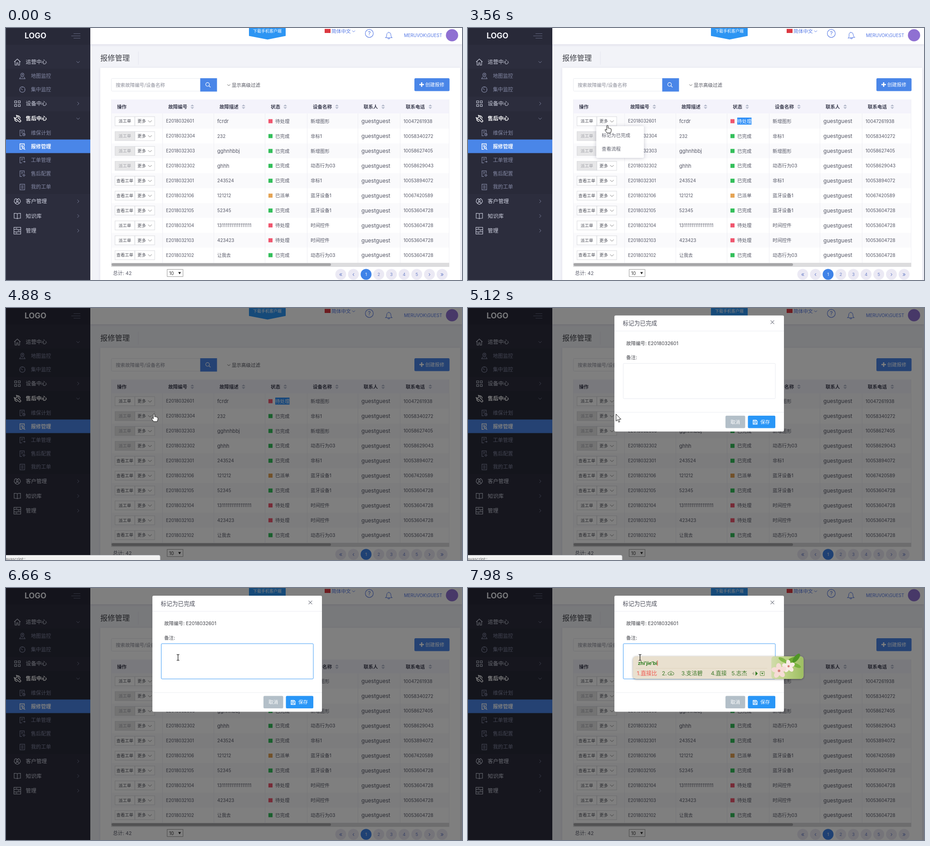
Recreate the animation shown at these times as an HTML page with a canvas. Size 1006 by 557 pixels, loop 8000 ms.

```html
<!DOCTYPE html>
<html lang="zh">
<head>
<meta charset="utf-8">
<title>报修管理</title>
<style>
html, body { margin: 0; width: 100%; height: 100%; overflow: hidden; background: #f2f3f8; }
canvas { display: block; }
</style>
</head>
<body>
<canvas id="stage" width="1006" height="557"></canvas>
<script>
const LOOP = 8000;
const c = document.getElementById('stage').getContext('2d');
const FONT = 'Inter, "Noto Sans CJK SC", "Noto Sans CJK", sans-serif';
const BLUE = '#4a86e8';
const clamp = v => Math.max(0, Math.min(1, v));
const smooth = p => p * p * (3 - 2 * p);

function rect(x, y, w, h, color) {
  c.fillStyle = color;
  c.fillRect(x, y, w, h);
}
function round(x, y, w, h, r, fill, stroke) {
  c.beginPath();
  c.roundRect(x, y, w, h, r);
  if (fill) { c.fillStyle = fill; c.fill(); }
  if (stroke) { c.strokeStyle = stroke; c.lineWidth = 1; c.stroke(); }
}
function disc(x, y, r, fill) {
  c.beginPath();
  c.arc(x, y, r, 0, 7);
  c.fillStyle = fill;
  c.fill();
}
function oval(x, y, rx, ry, turn, fill) {
  c.beginPath();
  c.ellipse(x, y, rx, ry, turn, 0, 7);
  c.fillStyle = fill;
  c.fill();
}
function shape(points, fill) {
  c.beginPath();
  points.forEach(([x, y]) => c.lineTo(x, y));
  c.closePath();
  c.fillStyle = fill;
  c.fill();
}
// y is the visual middle of the line
function text(s, x, y, size, color, weight = 400, align = 'left', font = FONT) {
  c.font = `${weight} ${size}px ${font}`;
  c.textAlign = align;
  c.fillStyle = color;
  c.fillText(s, x, y + size * 0.36);
}
// d is drawn in a 16 unit box centred on x, y
function icon(d, x, y, size, color, width = 1.1) {
  c.save();
  c.translate(x - size / 2, y - size / 2);
  c.scale(size / 16, size / 16);
  c.strokeStyle = color;
  c.lineWidth = width * 16 / size;
  c.stroke(new Path2D(d));
  c.restore();
}
function shadowed(blur, dy, color, draw) {
  c.save();
  c.shadowColor = color;
  c.shadowBlur = blur;
  c.shadowOffsetY = dy;
  draw();
  c.restore();
}

const DOWN = 'M1 5L8 12L15 5', RIGHT = 'M5 1L12 8L5 15';
const DOC = 'M13 7V1H2V15H7M5 5H10M5 8H9';
const ICONS = {
  home: 'M1 8L8 1.5L15 8M3 7V15H6.5V10H9.5V15H13V7',
  pin: 'M8 11C5 8 4 7 4 5A4 4 0 0 1 12 5C12 7 11 8 8 11ZM4 10L1 15H15L12 10M9 5A1 1 0 1 1 7 5A1 1 0 1 1 9 5',
  gauge: 'M15 8A7 7 0 1 1 1 8A7 7 0 1 1 15 8M9 9L4 5M8 1V3M13 8H15M1 8H3',
  grid: 'M2 2h4.5v4.5h-4.5zM10 2h4.5v4.5h-4.5zM2 10h4.5v4.5h-4.5zM10 10h4.5v4.5h-4.5z',
  wrench: 'M6 1A5 5 0 0 1 10 7L15 12A2 2 0 0 1 12 15L7 10A5 5 0 0 1 1 6L4 7.5L7 5ZM9 2A5 5 0 0 1 14 8M2 10A5 5 0 0 0 8 14',
  plan: DOC + 'M15 12A3 3 0 1 1 9 12A3 3 0 1 1 15 12M12 10V12H14',
  repair: DOC + 'M13 11A2.5 2.5 0 1 1 8 11A2.5 2.5 0 1 1 13 11M12 13L15 16',
  order: DOC + 'M9 12H15M13 10L15 12L13 14',
  config: DOC + 'M14 12A2 2 0 1 1 10 12A2 2 0 1 1 14 12M12 8.5V10M12 14V15.5M8.5 12H10M14 12H15.5',
  mine: 'M2 1H14V15H2ZM5 5H11M5 8H11M5 11H11',
  client: 'M2 4L5 2L8 4L11 2L14 5L15 9L12 13L8 15L4 13L1 9ZM10 7A2 2 0 1 1 6 7A2 2 0 1 1 10 7M4 12L8 9L12 12',
  book: 'M8 3C6 2 3 2 1 2V13C3 13 6 13 8 14C10 13 13 13 15 13V2C13 2 10 2 8 3V14',
  tune: 'M.5 .5H15.5V15.5H.5ZM.5 5.5H15.5M.5 10.5H15.5M4 3H8M9 8H13M4 13H8'
};
// icon, label, y, kind: d = open group, r = closed group, s = sub item
const MENU = [
  ['home', '运营中心', 75, 'd'], ['pin', '地图监控', 106, 's'], ['gauge', '集中监控', 136, 's'],
  ['grid', '设备中心', 167, 'r'], ['wrench', '售后中心', 200, 'd'], ['plan', '维保计划', 232, 's'],
  ['repair', '报修管理', 262, 's'], ['order', '工单管理', 292, 's'], ['config', '售后配置', 322, 's'],
  ['mine', '我的工单', 351.5, 's'], ['client', '客户管理', 383, 'r'], ['book', '知识库', 415.5, 'r'],
  ['tune', '管理', 448, 'r']
];
const COLS = [['操作', 245], ['故障编号', 358, 411], ['故障描述', 471, 524], ['状态', 584, 616],
  ['设备名称', 677, 730], ['联系人', 789, 832], ['联系电话', 882, 936]];
const STATES = { 待处理: '#f0566e', 已完成: '#34bf5b', 已派单: '#e5a455' };
// action, number, description, state, device, phone
const ROWS = [
  ['派工单', '2601', 'fcrdr', '待处理', '新增图形', '10047261938'],
  ['-派工单', '2304', '232', '已完成', '非标1', '10058340272'],
  ['-派工单', '2303', 'gghnhbbj', '已完成', '新增图形', '10058627405'],
  ['-派工单', '2302', 'ghhh', '已完成', '动态行为03', '10058629043'],
  ['查看工单', '2301', '243524', '已完成', '非标1', '10053894072'],
  ['查看工单', '2106', '121212', '已派单', '蓝牙设备1', '10067420589'],
  ['查看工单', '2105', '52345', '已完成', '蓝牙设备1', '10053604728'],
  ['派工单', '2104', '13' + '1'.repeat(16), '待处理', '时间控件', '10053604728'],
  ['派工单', '2103', '423423', '待处理', '时间控件', '10053604728'],
  ['查看工单', '2102', '让我去', '已完成', '动态行为03', '10053604728']
];

function sidebar() {
  rect(0, 0, 186, 557, '#2c2d3d');
  rect(0, 0, 186, 37, '#282938');
  rect(0, 90, 186, 62, '#292a39');
  rect(0, 184, 186, 183, '#292a39');
  text('LOGO', 41, 17, 17, '#f2f3f8', 700);
  [[149, 12.5], [144, 17.5], [149, 22.5]].forEach(([x, y]) => rect(x, y - .5, 164 - x, 1, '#62667f'));
  rect(0, 246.5, 186, 30, BLUE);
  for (const [name, label, y, kind] of MENU) {
    const sub = kind === 's', active = name === 'repair' || name === 'wrench';
    const color = active ? '#fff' : sub ? '#858aa6' : '#d0d3e2';
    icon(ICONS[name], sub ? 36 : 25, y, sub ? 14 : 16, color, active ? 1.5 : 1.1);
    text(label, sub ? 55 : 43.5, y, sub ? 11.1 : 11.7, color, active ? 600 : 400);
    if (!sub) icon(kind === 'd' ? DOWN : RIGHT, 159, y, 8, '#787d99', 1);
  }
}

function bell(t) {
  const shaking = [500, 3560, 5940].some(s => t >= s && t < s + 340);
  c.save();
  c.translate(844.5, 9);
  if (shaking) c.rotate(0.12 * Math.sin(t / 32));
  icon('M1 13C4 11 3 8 3.5 6A4.5 4.5 0 0 1 12.5 6C13 8 12 11 15 13ZM6 13.5A2 2 0 0 0 10 13.5M8 0V2', 0, 7.5, 16, '#6383e6');
  c.restore();
}

function header(t) {
  shadowed(5, 1, 'rgba(70,60,120,.16)', () => rect(186, 0, 820, 36, '#fff'));
  shape([[536, 0], [617, 0], [617, 17.5], [577, 25.5], [536, 17.5]], '#2d95f3');
  text('下载手机客户端', 576.5, 7, 9, '#fff', 400, 'center');
  rect(703, 2, 13, 9, '#dc3840');
  text('简体中文', 718, 7, 10.7, '#5578e5');
  icon(DOWN, 767, 7, 7, '#5578e5', 1);
  c.beginPath();
  c.arc(801.5, 12, 8.8, 0, 7);
  c.strokeStyle = '#6383e6';
  c.lineWidth = 1.2;
  c.stroke();
  text('?', 801.5, 12, 12, '#5578e5', 400, 'center');
  bell(t);
  text('MERUVOK\\GUEST', 878, 17, 9.7, '#5578e5');
  disc(984, 16, 13.5, '#8f70d2');
}

function outlineButton(s, x, y, off) {
  rect(x, y - 10.5, 44.5, 21, '#d9dade');
  rect(x + 1, y - 9.5, 42.5, 19, off ? '#e7e7e8' : '#fff');
  text(s, x + 22.2, y, 9.3, off ? '#a0a1a8' : '#4c4e58', 400, 'center');
}

function table(selectFrom) {
  rect(232, 158, 746, 31, '#f4f3fb');
  for (const [label, x, sort] of COLS) {
    text(label, x, 174, 10.5, '#3c3e50', 600);
    if (!sort) continue;
    shape([[sort - 4, 173], [sort, 169], [sort + 4, 173]], '#b4bacb');
    shape([[sort - 4, 175], [sort, 179], [sort + 4, 175]], '#b4bacb');
  }
  const ink = '#565867';
  ROWS.forEach(([action, no, note, state, device, phone], i) => {
    const y = 206 + 32.9 * i, off = action[0] === '-';
    rect(232, y - 16.5, 746, 32.9, i % 2 ? '#fff' : '#fafafc');
    outlineButton(action.replace('-', ''), 240, y, off);
    outlineButton('', 284, y);
    text('更多', 290, y, 9.4, '#4c4e58');
    icon(DOWN, 317.5, y, 9, '#777', 1);
    text('E201803' + no, 353, y, 9.7, ink);
    text(note, 466, y, /[a-z]/.test(note) ? 11.2 : 10, ink);
    rect(579, y - 4.5, 9, 9, STATES[state]);
    text(state, 594, y, 10.5, ink);
    text(device, 672, y, 10.4, ink);
    text('guestguest', 784, y, 12.1, ink);
    text(phone, 877, y, 10, ink);
  });
  [345, 458, 571, 664, 776, 869].forEach(x => rect(x, 189, 1, 330, '#eeeef3'));
  rect(232, 158, 1, 361, '#f0f0f5');
  rect(977, 158, 1, 361, '#f0f0f5');
  if (selectFrom < 625) {
    c.save();
    c.beginPath();
    c.rect(selectFrom, 198, 625.5 - selectFrom, 15.5);
    c.clip();
    rect(594, 198, 32, 16, '#2f8ff7');
    text('待处理', 594, 206, 10.5, '#fff');
    c.restore();
  }
  rect(232, 519, 746, 9, '#dcdcde');
  round(233, 520, 484, 6, 3, '#a6a6a8');
}

function page(t, selectFrom) {
  rect(0, 0, 1006, 557, '#f2f3f8');
  text('报修管理', 208, 66, 16.3, '#3f4047');
  rect(291.5, 52, 1, 29, '#e4e6ee');
  shadowed(6, 1, 'rgba(70,60,120,.10)', () => rect(208, 88, 794, 480, '#fff'));
  header(t);
  sidebar();
  round(232.5, 111.5, 200, 28, 2, '#fff', '#e8eaf0');
  text('搜索故障编号/设备名称', 242, 126, 10.5, '#8a8c98');
  rect(428.5, 111, 37, 29.5, BLUE);
  icon('M12 7A5 5 0 1 1 2 7A5 5 0 1 1 12 7M10.5 10.5L15 15', 445.5, 125.5, 13, '#fff', 1.2);
  icon(DOWN, 491.5, 126, 7, '#555', 1);
  text('显示高级过滤', 498, 126, 10.5, '#4f515c');
  round(901, 111, 77.5, 28.5, 2.5, BLUE);
  rect(912, 123.7, 10, 2.6, '#fff');
  rect(915.7, 120, 2.6, 10, '#fff');
  text('创建报修', 925, 125, 10.5, '#fff', 500);
  table(selectFrom);
  text('总计: 42', 236, 542, 10.8, '#565867');
  round(355.5, 533.5, 35, 16, 0, '#fff', '#999');
  text('10', 360, 542, 10, '#333');
  shape([[380, 539.5], [386, 539.5], [383, 544.5]], '#222');
  ['«', '‹', 1, 2, 3, 4, 5, '›', '»'].forEach((s, i) => {
    const x = 738.5 + 27.95 * i, on = s === 1;
    disc(x, 544.5, 12, on ? '#3f83e8' : '#ebe9f4');
    text(String(s), x, 544.5, typeof s === 'number' ? 9.5 : 13, on ? '#fff' : '#6e83c8', 400, 'center');
  });
}

function dropdown(hover) {
  shadowed(9, 1, 'rgba(60,60,90,.28)', () => round(283, 217, 105, 70, 2, '#fff'));
  if (hover) rect(283, 223, 105, 29, '#f4f5f8');
  text('标记为已完成', 295, 237.5, 10.5, '#5c5e6b');
  text('查看流程', 295, 267, 10.5, '#5c5e6b');
}

function statusBar() {
  round(-5, 546.5, 345, 20, 3, '#f2f2f2', '#c4c6ca');
  text('avascript:;', -1, 554.5, 9, '#666');
}

function modal(t) {
  const p = clamp((t - 4940) / 200);
  if (!p) return;
  c.save();
  c.globalAlpha = clamp(p * 1.5);
  c.translate(0, -64 * (1 - p) ** 2);
  round(323, 17, 374, 256.5, 3, '#fff');
  text('标记为已完成', 341.5, 34.5, 12.6, '#4a4c58');
  icon('M1 1L15 15M15 1L1 15', 671.5, 32, 9, '#777a85', 1.1);
  rect(323, 51, 374, 1, '#ebedf2');
  rect(323, 230.5, 374, 1, '#ebedf2');
  text('故障编号: E2018032601', 349, 78.5, 10.5, '#3f4047');
  text('备注:', 349, 110, 10.5, '#3f4047');
  const focused = t >= 6130;
  round(342.5, 123, 335.5, 78, 2, '#fff', focused ? '#3f9bf5' : '#e8eaf0');
  if (focused && Math.floor((t - 6130) / 530) % 2 === 0) rect(353, 129, 1, 15, '#222');
  round(568, 238.5, 43.5, 27.5, 2.5, '#b3bfc8');
  text('取消', 589.7, 252.5, 10.5, '#fff', 400, 'center');
  round(617.5, 238.5, 60.5, 27.5, 2.5, '#2996f7');
  icon('M2 2H11L14 5V14H2ZM5 2V6H10V2M5 14V9.5H11V14', 633.5, 253, 12, '#fff', 1.3);
  text('保存', 645, 252.5, 10.5, '#fff', 500);
  c.restore();
}

// start time, typed letters, candidates; * stands for the cloud sign
const TYPING = [
  [7120, 'z', '在 这 中 着 做'], [7200, 'zh', '这 中 着 只 种'], [7280, 'zhi', '直 只 指 之 至'],
  [7510, "zhi'j", '之间 * 直接 指节 之前'], [7610, "zhi'ji", '之际 * 直击 直接 指极'],
  [7740, "zhi'jie", '直接 * 指节 直解 之节'], [7890, "zhi'jie'b", '直接把 * 直接被 直接不 直接比'],
  [7970, "zhi'jie'bi", '直接比 * 支洁碧 直接 志杰']
];
// e is the right edge of the input panel
function flower(e) {
  const g = c.createLinearGradient(e - 72, 0, e, 0);
  g.addColorStop(0, '#d3dcae');
  g.addColorStop(.45, '#bdd286');
  g.addColorStop(1, '#9dbe62');
  round(e - 71, 151, 71, 50, [6, 7, 7, 6], g);
  oval(e - 27, 161, 17, 6, -.5, '#6da834');
  oval(e - 16, 155, 12, 5, -.9, '#4f9526');
  oval(e - 46, 159, 10, 4, .5, '#82b848');
  oval(e - 16, 171, 11, 4, .4, '#78b23e');
  for (const [x, y, r, tone] of [[e - 33, 173, 11, '#f8ebe5'], [e - 54, 183, 13, '#f6dcd6']]) {
    for (let i = 0; i < 5; i++) {
      const a = i * Math.PI * .4 - .4;
      oval(x + Math.cos(a) * r * .7, y + Math.sin(a) * r * .7, r * .62, r * .44, a, tone);
    }
    disc(x, y, r * .22, '#d47f78');
  }
}
function ime(t) {
  const step = TYPING.filter(s => t >= s[0]).pop();
  if (!step) return;
  const words = step[2].split(' '), size = 12.1;
  c.font = `400 ${size}px ${FONT}`;
  let end = 372.5;
  const slots = words.map((w, i) => {
    const label = `${i + 1}.${w}`, x = end;
    end += w === '*' ? 43 : c.measureText(label).width + (w === '支洁碧' ? 18 : 10.5);
    return [label, x, w === '*'];
  });
  end -= 10;
  const edge = end + 124;
  shadowed(4, 1, 'rgba(0,0,0,.4)', () => round(364, 151, edge - 364, 50, 7, '#e9e0cf'));
  rect(370, 177, edge - 450, 1, '#dfd4bf');
  flower(edge);
  text(step[1], 375, 166, 11, '#1f7514', 700, 'left', '"Liberation Sans", Arial, sans-serif');
  rect(375 + c.measureText(step[1]).width, 160, 1, 12, '#e04038');
  slots.forEach(([label, x, cloud], i) => {
    text(cloud ? '2.' : label, x, 188.5, size, i ? '#3f7a2c' : '#f0564e');
    if (cloud) icon('M4 13A3.5 3.5 0 0 1 4 6A4.5 4.5 0 0 1 12 6A3.5 3.5 0 0 1 12 13ZM10 9.5A2 2 0 1 1 6 9.5A2 2 0 1 1 10 9.5', x + 20, 188, 14, '#3f7a2c', 1);
  });
  shape([[end + 15, 185], [end + 10, 189], [end + 15, 193]], '#b9b79f');
  shape([[end + 18, 184], [end + 23, 189], [end + 18, 194]], '#2f7a1e');
  round(end + 28.5, 184.5, 9, 9, 0, null, '#6d9a50');
  shape([[end + 30.5, 187.5], [end + 35.5, 187.5], [end + 33, 191]], '#2f7a1e');
}

// time, x, y of the pointer
const PATH = [[70, 915, 546], [830, 688, 227], [1310, 632, 212], [1460, 632, 212], [1920, 599, 211],
  [2230, 599, 211], [2930, 307, 215], [3560, 307, 215], [4340, 326, 234], [5220, 326, 234],
  [5600, 351, 194], [5980, 379, 153]];
function pointerAt(t) {
  const i = PATH.findIndex(k => k[0] > t);
  if (i < 1) return (i ? PATH[PATH.length - 1] : PATH[0]).slice(1);
  const [t0, x0, y0] = PATH[i - 1], [t1, x1, y1] = PATH[i];
  const p = smooth((t - t0) / (t1 - t0));
  return [x0 + (x1 - x0) * p, y0 + (y1 - y0) * p];
}
const LOOKS = [[70, 'arrow'], [1200, 'beam'], [2300, 'arrow'], [2850, 'hand'], [4950, 'arrow'], [5450, 'beam']];
const ARROW = new Path2D('M0 0V15.5L3.6 12.2L6 18L8.4 17L6 11.4H11Z');
const HAND = new Path2D('M-1.5 0.5Q0 -1 1.5 0.5V6Q3 5 4 6.3Q5.5 5.6 6.3 7Q8.5 6.6 8.5 9V12L7 16.5H-1L-5 10.5Q-5.5 8.5 -3.5 8.8L-1.5 10.5Z');
const BEAM = new Path2D('M-3 -6.5H-1L0 -5.5L1 -6.5H3M0 -5.5V5.5M-3 6.5H-1L0 5.5L1 6.5H3');
function pointer(t, x, y) {
  const look = LOOKS.filter(k => t >= k[0]).pop();
  if (!look) return;
  c.save();
  c.translate(Math.round(x) + .5, Math.round(y) + .5);
  c.lineWidth = 1;
  c.strokeStyle = '#111';
  if (look[1] === 'beam') {
    c.lineWidth = 1.2;
    c.stroke(BEAM);
  } else {
    const body = look[1] === 'hand' ? HAND : ARROW;
    c.fillStyle = '#fff';
    c.fill(body);
    c.stroke(body);
  }
  c.restore();
}

function draw(t) {
  const [x, y] = pointerAt(t);
  let from = 626;
  if (t >= 1920) from = 594;
  else if (t >= 1460) from = 594 + 10.5 * Math.max(0, Math.round((x - 599) / 10.5));
  page(t, from);
  if (t >= 3160 && t < 4880) dropdown(y > 222);
  if (t >= 4880) rect(0, 0, 1006, 557, 'rgba(0,0,0,.5)');
  modal(t);
  if (t >= 4000 && t < 5800) statusBar();
  ime(t);
  pointer(t, x, y);
}

const start = performance.now();
function tick() {
  draw((performance.now() - start) % LOOP);
  requestAnimationFrame(tick);
}
tick();
</script>
</body>
</html>
```
